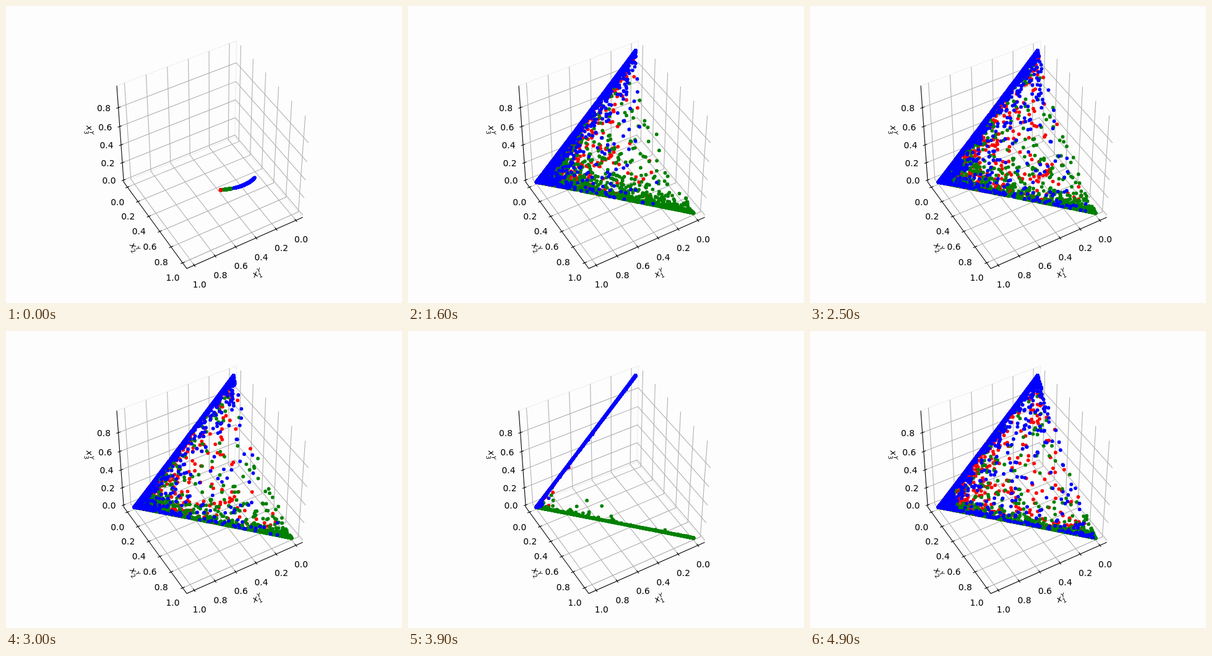
Recreate the animation shown at these times as an HTML page with a canvas. Size 640 by 480 pixels, loop 5000 ms.

```html
<!DOCTYPE html>
<html lang="en">
<head>
<meta charset="utf-8">
<title>Simplex scatter</title>
<style>
  html, body { margin: 0; width: 100%; height: 100%; overflow: hidden; background: #fdfdfd; }
  svg, canvas { position: absolute; left: 0; top: 0; }
  text { font: 13.89px "DejaVu Sans", sans-serif; text-anchor: middle; }
  .small { font-size: 9.7px; }
  .it { font-style: italic; }
</style>
</head>
<body>
<svg id="axes" width="640" height="480" viewBox="0 0 640 480"></svg>
<canvas id="dots" width="640" height="480"></canvas>
<script>
const mix = (a, b, u) => a + (b - a) * u;

// Perspective camera: azimuth 60 degrees, elevation 45 degrees, distance 10.
const ca = Math.cos(Math.PI / 3), sa = Math.sin(Math.PI / 3), tilt = Math.SQRT1_2;
function project(x, y, z) {
  const near = ca * x + sa * y;
  const scale = 2014 / (10 - tilt * (near + z));
  return [333 + scale * (ca * y - sa * x), 237.7 - scale * tilt * (z - near)];
}
const H = 0.546; // half the side of the box
const flat = v => (v - 0.5) * 0.957;
const tall = v => v * 1.041 - 0.5215;

function buildAxes() {
  let out = '';
  const line = (color, ...pts) => {
    const path = pts.map(p => project(...p)).join(' ');
    out += `<polyline points="${path}" fill="none" stroke="${color}" stroke-width="1.1"/>`;
  };
  const label = (point, dx, dy, value) => {
    const [x, y] = project(...point);
    out += `<text x="${x + dx}" y="${y + dy + 4.7}">${value.toFixed(1)}</text>`;
  };
  const pane = '#ececec', grid = '#b0b0b0', ink = '#000', t = 0.018;

  line(pane, [H, -H, H], [-H, -H, H], [-H, -H, -H], [H, -H, -H]);
  line(pane, [-H, -H, -H], [-H, H, -H]);

  for (let i = 0; i < 6; i++) {
    const v = i / 5, p = flat(v), q = tall(v);
    line(grid, [p, H, -H], [p, -H, -H], [p, -H, H]);
    line(grid, [H, p, -H], [-H, p, -H], [-H, p, H]);
    line(ink, [p, H - t, -H], [p, H + t, -H]);
    line(ink, [H - t, p, -H], [H + t, p, -H]);
    label([p, H, -H], 8.5, 31, v);
    label([H, p, -H], -16, 24.5, v);
    if (i === 5) break; // the upright axis stops short of 1.0
    line(grid, [H, -H, q], [-H, -H, q], [-H, H, q]);
    line(ink, [H - t, -H, q], [H + t, -H, q]);
    label([H, -H, q], -23.5, 1, v);
  }
  line(ink, [H, -H, H], [H, -H, -H], [H, H, -H], [-H, H, -H]);

  const axisName = (x, y, turn, n) => {
    out += `<g transform="translate(${x} ${y}) rotate(${turn})">
      <text class="it" x="-5" y="5">x</text>
      <text class="it small" x="3" y="0.5">Y</text>
      <text class="small" x="2" y="9">${n}</text></g>`;
  };
  axisName(407, 431, -24, 1);
  axisName(209, 391, 54, 2);
  axisName(135.5, 202, 86, 3);
  document.getElementById('axes').innerHTML = out;
}

let seed = 7;
const random = () => {
  seed = (seed * 16807) % 2147483647;
  return seed / 2147483647;
};
const bell = () => (random() + random() + random() - 1.5) * 2;

// start: place on the opening curve; aim: where ln(x2/x1), ln(x3/x1) drift;
// wide: how far each of them scatters.
const groups = [
  { color: '#ff0000', start: 0.04, aim: [-9, -8], wide: [1, 1.2] },
  { color: '#008000', start: 0.18, aim: [2, -9.5], wide: [1.6, 1] },
  { color: '#0000ff', start: 0.65, aim: [-10, 4], wide: [1, 1.6] }
];
for (const g of groups) g.noise = Array.from({ length: 2000 }, () => [bell(), bell()]);

const ctx = document.getElementById('dots').getContext('2d');

function draw(step) {
  const grow = 1 - Math.exp(-step / 2);
  const sharp = 0.2 + 0.006 * step + 0.55 * Math.exp(-(((step - 39) / 6) ** 2));
  const sway = Math.cos((step - 8) / 13 * 2 * Math.PI);
  const spread = 3.4 * (1 - Math.exp(-step / 16));

  ctx.clearRect(0, 0, 640, 480);
  for (const { color, start, aim, wide, noise } of groups) {
    ctx.fillStyle = color;
    for (const [p, q] of noise) {
      const s = start * (1 + 0.18 * p);
      const a = aim[0] * sharp + 2 * sway + wide[0] * spread * p;
      const b = aim[1] * sharp + 0.5 * sway + wide[1] * spread * q;
      const e2 = Math.exp(mix(0.17 + 1.26 * s, a, grow));
      const e3 = Math.exp(mix(2.2 * s - 1.97, b, grow));
      const sum = 1 + e2 + e3;
      const [x, y] = project(flat(1 / sum), flat(e2 / sum), tall(e3 / sum));
      ctx.beginPath();
      ctx.arc(x, y, 2.9, 0, 7);
      ctx.fill();
    }
  }
}

let shown = -1;
function play() {
  const step = Math.floor(performance.now() / 100) % 50;
  if (step !== shown) draw(shown = step);
  requestAnimationFrame(play);
}
buildAxes();
play();
</script>
</body>
</html>
```
